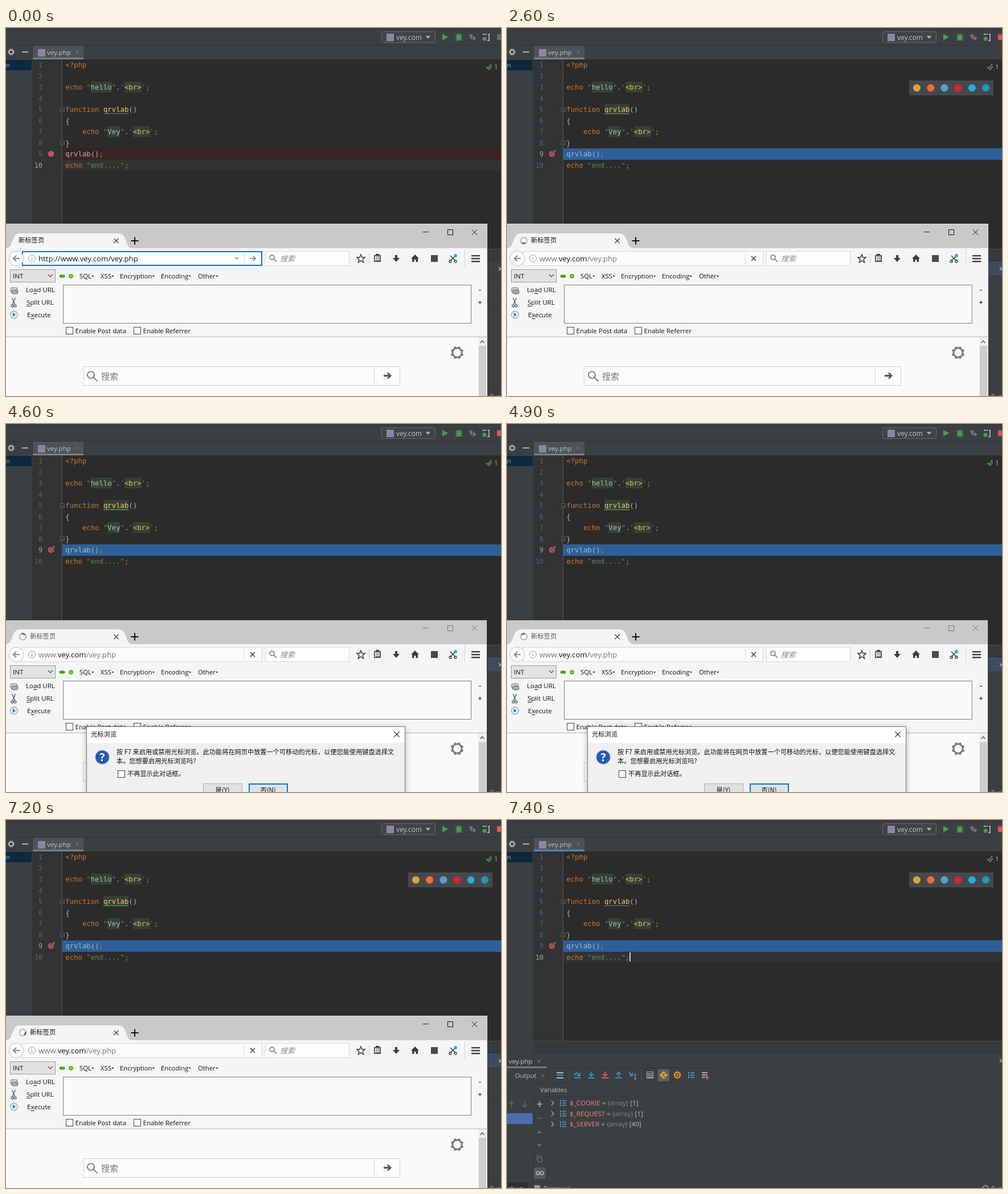
Recreate the animation shown at these times as an HTML page with a canvas. Size 869 by 645 pixels, loop 8 s.

```html
<!DOCTYPE html>
<html lang="zh-CN">
<head>
<meta charset="utf-8">
<title>Breakpoint session</title>
<style>
  html, body { margin: 0; width: 100%; height: 100%; overflow: hidden; background: #2b2b2b; }
  canvas { display: block; width: 100%; height: 100%; }
</style>
</head>
<body>
<canvas id="stage" width="869" height="645"></canvas>
<script>
const ctx = document.getElementById('stage').getContext('2d');
const UI = '"Open Sans", "Noto Sans CJK SC", "Noto Sans CJK", sans-serif';
const CJK = '"Noto Sans CJK SC", "Noto Sans CJK", sans-serif';
const MONO = '"DejaVu Sans Mono", "Noto Sans Mono", monospace';
const LOOP = 8000;

// Moments at which the picture changes, in ms
const T = {
  caretOn: 500, caretOff: 1000, load: 1400, pause: 1500, session: 1600, hover: 1700,
  leave: 4100, dialog: 4600, hoverAgain: 5500, buttonHover: 6000, dialogEnd: 6400,
  minimize: 7300, focus: 7400
};

function rect(x, y, w, h, color) {
  ctx.fillStyle = color;
  ctx.fillRect(x, y, w, h);
}

function frame(x, y, w, h, color, lw = 1) {
  ctx.strokeStyle = color;
  ctx.lineWidth = lw;
  ctx.strokeRect(x + lw / 2, y + lw / 2, w - lw, h - lw);
}

function box(x, y, w, h, fill, border, lw) {
  rect(x, y, w, h, fill);
  frame(x, y, w, h, border, lw);
}

function rounded(x, y, w, h, r, fill, border) {
  ctx.beginPath();
  ctx.roundRect(x, y, w, h, r);
  if (fill) { ctx.fillStyle = fill; ctx.fill(); }
  if (border) { ctx.strokeStyle = border; ctx.lineWidth = 1; ctx.stroke(); }
}

// Fills the path, or strokes it when a line width is given; x, y is its centre
function path(d, x, y, color, lw) {
  const p = new Path2D(d);
  ctx.save();
  ctx.translate(x, y);
  if (lw) { ctx.strokeStyle = color; ctx.lineWidth = lw; ctx.stroke(p); }
  else { ctx.fillStyle = color; ctx.fill(p); }
  ctx.restore();
}

function circle(x, y, r, color, lw, from = 0, to = Math.PI * 2) {
  ctx.beginPath();
  ctx.arc(x, y, r, from, to);
  if (lw) { ctx.strokeStyle = color; ctx.lineWidth = lw; ctx.stroke(); }
  else { ctx.fillStyle = color; ctx.fill(); }
}

function text(s, x, y, size, color, family = UI, style = '', align = 'left') {
  ctx.font = `${style} ${size}px ${family}`;
  ctx.textAlign = align;
  ctx.fillStyle = color;
  ctx.fillText(s, x, y);
  return x + ctx.measureText(s).width;
}

// Writes [text, color] pieces one after another
function pieces(list, x, y, size, family) {
  for (const [s, color] of list) x = text(s, x, y, size, color, family);
}

const cross = (x, y, r, color, lw = 1) =>
  path(`M${-r} ${-r}L${r} ${r}M${r} ${-r}L${-r} ${r}`, x, y, color, lw);
const plus = (x, y, r, color, lw = 1) =>
  path(`M${-r} 0H${r}M0 ${-r}V${r}`, x, y, color, lw);
const triangle = (x, y, r, color) => path(`M${-r} ${-r / 2}H${r}L0 ${r / 2 + .5}Z`, x, y, color);

function magnifier(x, y, r, color, lw) {
  circle(x, y, r, color, lw);
  path(`M${r * .7} ${r * .7}L${r * 1.9} ${r * 1.9}`, x, y, color, lw);
}

function gear(x, y, r, color, lw) {
  circle(x, y, r, color, lw);
  for (let i = 0; i < 8; i++) {
    const a = i * Math.PI / 4 + .39;
    circle(x, y, r + lw * .7, color, lw * .7, a - .17, a + .17);
  }
}

/* ---------- code editor ---------- */

const KEY = '#cc7832', STR = '#6a8759', PLAIN = '#a9b7c6', TAG = '#e8bf6a', FN = '#ffc66d';
const CELL = 7.4, ROW = 19.5, CODE_X = 104.3;
const echo = (indent, word) => [
  [indent + 'echo ', KEY], ['"', STR], [word, PLAIN], ['"', STR], ['.', PLAIN],
  ["'", STR], ['<br>', TAG], ["'", STR], [';', KEY]
];
const CODE = [
  [['<?php', KEY]],
  [],
  echo('', 'hello'),
  [],
  [['function ', KEY], ['qrvlab', FN], ['()', PLAIN]],
  [['{', PLAIN]],
  echo('    ', 'Vey'),
  [['}', PLAIN]],
  [['qrvlab()', PLAIN], [';', KEY]],
  [['echo ', KEY], ['"end...."', STR], [';', KEY]]
];

function mark(line, col, count, color = '#364135') {
  rect(Math.round(CODE_X + col * CELL), Math.round(55 + (line - 1) * ROW), Math.round(count * CELL), 19, color);
}

function fileIcon(x, y) {
  rect(x - 6, y - 6, 13, 13, '#8f84a8');
}

function toolbar(session) {
  rect(0, 0, 869, 56, '#3c3f41');
  rect(0, 0, 869, 2, '#36393b');
  rect(0, 30, 869, 1, '#323537');
  rounded(659.5, 6.5, 94, 19, 3, '#3f4345', '#6a6d6f');
  fileIcon(674, 16);
  text('vey.com', 685, 20.5, 11.9, '#c4c6c8');
  triangle(741, 16, 4.5, '#adb0b2');
  path('M-5 -5.5L5.5 0L-5 5.5Z', 771, 16, '#499c54');
  circle(795, 17, 4.5, '#499c54');
  path('M-6 -3H6M-6 1H6M-6 5H6M-3 -6L0 -3L3 -6', 795, 16, '#499c54', 1.4);
  path('M-5 -5H1V5Q-5 2 -5 -5Z', 818, 16, '#6c7073');
  path('M0 -2L6 2L0 6Z', 820, 16, '#777b7e');
  path('M-5 -5H-1M0 -5H2M4 -5H6V6H3', 842, 16, '#b0b3b5', 1.8);
  circle(840, 19, 3.5, '#499c54');
  rect(862, 11, 7, 10, session ? '#db5860' : '#696c6e');
}

function editor(t) {
  const paused = t >= T.pause, session = t >= T.session, focused = t >= T.focus;
  const current = paused && !focused ? 9 : 10;

  toolbar(session);
  rect(0, 56, 46, 353, '#3c3f41');
  rect(0, 56, 45, 18, '#0d293e');
  text('n', 0, 69, 11.5, '#8aa6bd');
  gear(9, 42, 3.6, '#b4b8ba', 2.2);
  rect(28, 41, 11, 2, '#b4b8ba');
  rect(46, 31, 1, 378, '#323232');

  rect(47, 31, 89, 23, '#4e5254');
  rect(47, 52, 89, 3, (paused && !session) || focused ? '#4a88c7' : '#7b8187');
  fileIcon(62, 43);
  text('vey.php', 72, 47, 11.6, '#c4c6c8');
  cross(125, 42, 3, '#777b7d');

  rect(47, 55, 822, 333, '#2b2b2b');
  rect(47, 55, 52, 333, '#313335');
  rect(98, 55, 1, 333, '#555758');
  if (current === 10) rect(99, 231, 770, 19, '#323232');
  rect(99, 211, 770, 20, paused ? '#2d6099' : '#3a2323');

  mark(3, 6, 5);
  mark(3, 14, 4);
  mark(7, 10, 3);
  mark(7, 16, 4);
  if (session && !focused) mark(5, 9, 6, '#344134');

  CODE.forEach((line, i) => {
    const y = 69 + i * ROW;
    text(i + 1, 64, y, 11.6, i + 1 === current ? '#a4a3a3' : '#606366', MONO, '', 'right');
    pieces(line, CODE_X, y, 12.3, MONO);
  });

  let wave = 'M0 0';
  for (let x = 2; x <= 44; x += 2) wave += `L${x} ${x % 4 ? -2 : 0}`;
  path(wave, 171, 151, '#659c6b', 1);
  for (const y of [143, 201]) {
    box(95, y - 4, 8, 8, '#2b2b2b', '#5d6062');
    rect(97, y, 4, 1, '#7b7e80');
  }
  circle(79, 220.5, 5.3, '#c75450');
  if (session) {
    path('M-2 -1L1 2L6 -5', 79, 219, '#313335', 4);
    path('M-2 -1L1 2L6 -5', 79, 219, '#db7a7a', 1.5);
  }
  path('M-5 0L-2 3L4 -5M-1 4L0 5L5 -1', 848, 68, '#499c54', 1.8);
  text('1', 857, 72, 11.6, '#b4b7b9');

  if ((t >= T.hover && t < T.leave) || t >= T.hoverAgain) {
    rounded(706, 92, 148, 26, 1, '#45494b');
    ['#d9a33c', '#f26b3a', '#5b9bd5', '#d9252e', '#27a9df', '#2496b4']
      .forEach((color, i) => circle(719.5 + i * 24.2, 105, 6.5, color));
  }
  if (focused) rect(215, 232, 2, 16, '#d0d0d0');
}

/* ---------- debugger panel ---------- */

function stepIcon(x, color, d) {
  path(d, x, 447, color, 1.8);
}

function listIcon(x, y) {
  for (const dy of [-5, -1, 3]) {
    rect(x - 1, y + dy, 7, 2, '#3592c4');
    rect(x - 5, y + dy, 2, 2, '#9aa7b0');
  }
}

function debugPanel(t) {
  const active = t >= T.session && t < T.focus;
  rect(0, 387, 869, 258, '#3c3f41');
  rect(47, 388, 822, 20, '#37393b');
  rect(47, 387, 822, 1, '#4c4f51');
  rect(0, 408, 869, 1, '#323232');
  rect(0, 409, 869, 25, active ? '#3d4b5c' : '#3c3f41');
  text('vey.php', 3, 427, 11.6, '#bfc2c4');
  cross(56, 423, 3, '#787c7e');
  cross(868, 422, 3, '#afb1b3', 1.4);
  rect(0, 434, 869, 1, '#323537');
  rect(0, 432, 70, 3, '#747a80');

  text('Output', 14, 452, 11.3, '#bbbdbf');
  cross(63, 448, 3, '#787c7e');
  for (const y of [442, 446, 451]) rect(87, y, 12, 2, y === 446 ? '#3592c4' : '#9cc3d8');
  rect(109, 438, 1, 20, '#515557');
  rect(236, 438, 1, 20, '#515557');
  stepIcon(123, '#3592c4', 'M-6 1L-1 -4L5 1M5 -4V1H0M-5 5H6');
  const down = 'M0 -6V1M-4 -2L0 2L4 -2M-6 5H6';
  stepIcon(148, '#3592c4', down);
  stepIcon(172, '#db5860', down);
  stepIcon(196, '#3592c4', 'M0 3V-5M-4 -1L0 -5L4 -1M-6 5H6');
  stepIcon(219, '#3592c4', 'M-5 -5L0 0M1 -4V1H-4');
  path('M-2 -4H2M0 -4V4M-2 4H2', 225, 450, '#afb1b3', 1);
  frame(245, 441, 12, 12, '#afb1b3');
  for (let i = 0; i < 9; i++) rect(247 + i % 3 * 3, 444 + (i / 3 | 0) * 3, 2, 2, '#afb1b3');
  rounded(265, 437, 20, 21, 2, '#5c6164');
  path('M0 -7L7 0L0 7L-7 0Z', 275, 447, '#e0a33a');
  circle(276, 447, 2.5, '#6a4d18', 1.2, .8, 5.5);
  circle(299, 447, 6.5, '#c98a2b');
  circle(299, 447, 2.7, '#4a3817', 1.2);
  listIcon(323, 447);
  for (const y of [442, 446, 450]) rect(342, y, y === 450 ? 6 : 10, 2, '#afb1b3');
  plus(351, 451, 4, '#db5860', 2);

  text('Variables', 58, 477, 11.1, '#bbbdbf');
  rect(0, 460, 869, 1, '#35383a');
  rect(47, 485, 822, 1, '#323537');
  rect(46, 460, 1, 175, '#323537');
  path('M0 5V-5M-4 -1L0 -5L4 -1', 8, 498, '#65696b', 1.5);
  path('M0 -5V5M-4 1L0 5L4 1', 31, 498, '#65696b', 1.5);
  rect(0, 514, 45, 19, '#4b6eaf');
  plus(57.5, 498, 5, '#afb1b3', 1.7);
  rect(52, 522, 10, 1.5, '#65696b');
  path('M-5 2H5L0 -3Z', 57, 547, '#65696b');
  path('M-5 -2H5L0 3Z', 57, 570, '#65696b');
  frame(52, 588, 8, 9, '#6f7375');
  box(54, 591, 8, 9, '#3c3f41', '#6f7375');
  rounded(47, 609, 21, 20, 2, '#54585a');
  circle(54, 619, 2.8, '#c0c2c4', 1.3);
  circle(61, 619, 2.8, '#c0c2c4', 1.3);

  [['$_COOKIE', 1], ['$_REQUEST', 1], ['$_SERVER', 40]].forEach(([name, size], i) => {
    const y = 496 + i * 18.6;
    path('M-2 -4L2 0L-2 4', 80, y, '#a9acae', 1.4);
    listIcon(98, y);
    pieces([[name, '#f5827f'], [' = ', '#bbbdbf'], ['{array} ', '#85888a'], [`[${size}]`, '#bbbdbf']],
      110, y + 4, 11.6, UI);
  });

  rect(0, 635, 869, 1, '#323232');
  rect(0, 636, 37, 9, '#2d2f30');
  text('Debug', -8, 650, 11.5, '#d0d2d4');
  rect(48, 640, 10, 5, '#9da0a2');
  text('Terminal', 64, 650, 11.5, '#bbbdbf');
  circle(840, 646, 5, '#afb1b3', 1.3);
  text('Event Log', 850, 650, 11.5, '#bbbdbf');
}

/* ---------- web browser ---------- */

function tabStrip(t, active) {
  const loading = t >= T.load, ink = active ? '#111' : '#777';
  rect(0, 344, 844, 301, '#f5f5f5');
  rect(0, 344, 844, 42, '#c9c9c9');
  path('M0 386C14 385 8 361 24 360H198C214 361 208 385 222 386Z', 0, 0, '#f5f5f5');
  text('新标签页', loading ? 42 : 22, 376, 11.3, active ? '#111' : '#555', CJK);
  if (loading) {
    const tick = Math.floor((t < 4300 ? t : Math.max(t - 300, 4300)) / 100);
    const angle = -Math.PI / 4 - (tick - 40) * .175;
    circle(29.5, 372.5, 5.8, '#999', 1.3);
    circle(29.5, 372.5, 4.8, '#6b6b6b', 2.8, angle - .7, angle + .7);
  }
  cross(193.5, 373, 4.2, '#444', 1.3);
  plus(226, 373, 6.5, '#111', 2);
  rect(732, 357, 10, 1, ink);
  frame(775, 353, 10, 10, ink);
  cross(822.5, 358, 4.7, ink, 1);
}

function addressBar(t) {
  const loading = t >= T.load;
  box(28, 391, 422, 26, loading ? '#fbfbfb' : '#fff', loading ? '#d4d4d4' : '#0a74d1', loading ? 1 : 2);
  circle(18, 404, 13, '#fafafa');
  circle(18, 404, 13, '#c4c4c4', 1);
  path('M6 0H-5M0 -5L-5 0L0 5', 18, 404, '#8c8c8c', 2.2);
  circle(45.5, 404, 6, '#999', 1);
  rect(45, 403, 1, 4, '#888');
  rect(45, 401, 1, 1, '#888');
  if (loading) {
    pieces([['www.', '#777'], ['vey.com', '#111'], ['/vey.php', '#777']], 57, 409, 13.2, UI);
    cross(433, 404, 4, '#666', 1.8);
  } else {
    text('http://www.vey.com/vey.php', 57, 409, 13.2, '#111');
    path('M-5 0H5M1 -4L5 0L1 4', 433, 404, '#777', 1.6);
  }
  if (t < T.session) triangle(405, 404, 4.5, '#bbb');
  rect(418, 394, 1, 20, '#dedede');
  if (t >= T.caretOn && t < T.caretOff) rect(233, 395, 1, 18, '#111');

  box(455, 391, 148, 26, '#fdfdfd', '#d6d6d6');
  magnifier(467, 402, 4, '#777', 1.6);
  text('搜索', 481, 409, 13, '#888', CJK, 'italic');
}

function browserIcons() {
  const ink = '#3d3d3d';
  path('M0 -7L2 -2L7 -2L3 2L4.500 7L0 4L-4.500 7L-3 2L-7 -2L-2 -2Z', 623, 404, ink, 1.5);
  rect(637, 395, 1, 18, '#ccc');
  frame(646, 398, 12, 12, ink, 1.6);
  rect(649, 396, 6, 3, ink);
  for (const y of [401, 404, 407]) rect(649, y, 7, 1, ink);
  path('M-2 -6H2V-1H6L0 6L-6 -1H-2Z', 685, 404, ink);
  path('M0 -7L7 0H5V6H1.500V2H-1.500V6H-5V0H-7Z', 718, 404, ink);
  rect(746, 398, 12, 12, '#4a4a4a');
  path('M-5 -5L4 4M-5 4L3 -4', 785, 404, ink, 1.5);
  circle(780, 409, 2, ink, 1.3);
  circle(789, 409, 2, ink, 1.3);
  circle(789, 399, 3, '#18b9d0');
  rect(805, 388, 1, 31, '#d7d7d7');
  for (const y of [398, 403, 408]) rect(817, y, 15, 2.4, ink);
}

function queryBar() {
  const ink = '#111';
  box(7, 423, 80, 23, '#e2e2e2', '#9a9a9a');
  text('INT', 12, 439, 11.5, ink);
  path('M-4 -2L0 2L4 -2', 78, 434, '#444', 1.1);
  rounded(94, 433, 9, 4, 2, '#48b516', '#2d7d0b');
  circle(114, 435, 3.7, '#3d9f12');
  plus(114, 435, 2.5, '#75e13b', 1.8);
  [['SQL', 129], ['XSS', 166], ['Encryption', 200], ['Encoding', 272], ['Other', 337]].forEach(([name, x]) => {
    const end = text(name, x, 439, 11.3, ink);
    triangle(end + 2.5, 435, 2, ink);
  });

  // The underlined access key stands after the given prefix
  [['Load URL', 35, 463, 'Lo', 'a'], ['Split URL', 36, 485, '', 'S'], ['Execute', 37, 507, 'E', 'x']]
    .forEach(([label, x, y, before, key]) => {
      text(label, x, y, 11.5, ink);
      rect(x + ctx.measureText(before).width, y + 2, ctx.measureText(key).width, 1, ink);
    });
  rounded(8, 455, 12, 9, 3, '#d5d5d5', '#777');
  rounded(10, 459, 11, 7, 3, '#aaa', '#666');
  path('M-3 -8L2 3M3 -8L-2 3', 13.5, 481, '#48606f', 1.4);
  circle(11, 487, 2, '#48606f', 1.3);
  circle(16, 487, 2, '#48606f', 1.3);
  circle(14, 502.5, 6.3, '#e2eff9');
  circle(14, 502.5, 6.3, '#86a9c4', 1.2);
  path('M-2 -3.500L3 0L-2 3.500Z', 14, 502.5, '#2878bb');

  box(100, 450, 717, 68, '#fafafa', '#7d7d7d');
  rect(830, 459, 4, 1, ink);
  plus(832, 481, 3, ink);
  [['Enable Post data', 105], ['Enable Referrer', 224]].forEach(([label, x]) => {
    box(x, 524, 13, 13, '#fff', '#444');
    text(label, x + 16.5, 535, 11.5, ink);
  });
}

function page() {
  rect(0, 541, 844, 1, '#b5b5b5');
  rect(0, 542, 829, 103, '#fafafa');
  rect(829, 542, 15, 103, '#f0f0f0');
  path('M-3.500 2L0 -2L3.500 2', 836, 550, '#555', 1.4);
  rect(830, 557, 13, 88, '#cdcdcd');
  gear(792, 569, 8.2, '#777', 3);
  box(135, 593, 557, 34, '#fcfcfc', '#d2d2d2');
  magnifier(149, 608, 6, '#6b6b6b', 1.7);
  text('搜索', 167, 616, 15, '#777', CJK);
  rect(646, 594, 1, 32, '#d2d2d2');
  path('M-6 0H5M1 -5L6 0L1 5', 669, 609.5, '#555', 2.8);
}

function dialog(hovered) {
  const ink = '#111';
  ctx.save();
  ctx.shadowColor = 'rgba(0,0,0,.3)';
  ctx.shadowBlur = 10;
  ctx.shadowOffsetY = 2;
  rect(141, 530, 560, 130, '#f0f0f0');
  ctx.restore();
  rect(141, 530, 560, 29, '#fff');
  frame(141, 530, 560, 130, '#777');
  text('光标浏览', 149, 548, 11.3, ink, CJK);
  cross(686, 544, 4.7, ink, 1.1);
  circle(169, 584, 13, '#b9c9dd');
  circle(169, 584, 11.8, '#2459b5');
  text('?', 169, 591, 19, '#fff', UI, 'bold', 'center');
  text('按 F7 来启用或禁用光标浏览。此功能将在网页中放置一个可移动的光标\uff0c以便您能使用键盘选择文',
    194, 579, 11.2, ink, CJK);
  text('本。您想要启用光标浏览吗?', 194, 595, 11.2, ink, CJK);
  box(196, 607, 13, 13, '#fff', '#444');
  text('不再显示此对话框。', 213, 617, 11.2, ink, CJK);
  box(346, 630, 69, 23, '#e1e1e1', '#adadad');
  text('是(Y)', 380, 646, 11.3, ink, CJK, '', 'center');
  box(426, 630, 69, 23, hovered ? '#e5f1fb' : '#e1e1e1', '#0078d7', 2);
  text('否(N)', 460, 646, 11.3, ink, CJK, '', 'center');
}

function browser(t) {
  const asking = t >= T.dialog && t < T.dialogEnd;
  tabStrip(t, !asking);
  addressBar(t);
  browserIcons();
  queryBar();
  page();
  // The window edge is light only while the window has focus
  const edge = asking ? '#3a3b3c' : '#e2e2e2';
  rect(0, 343, 845, 1, edge);
  rect(844, 343, 1, 302, edge);
  if (asking) dialog(t >= T.buttonHover);
}

function draw() {
  const t = performance.now() % LOOP;
  editor(t);
  debugPanel(t);
  if (t < T.minimize) browser(t);
  requestAnimationFrame(draw);
}
draw();
</script>
</body>
</html>
```
